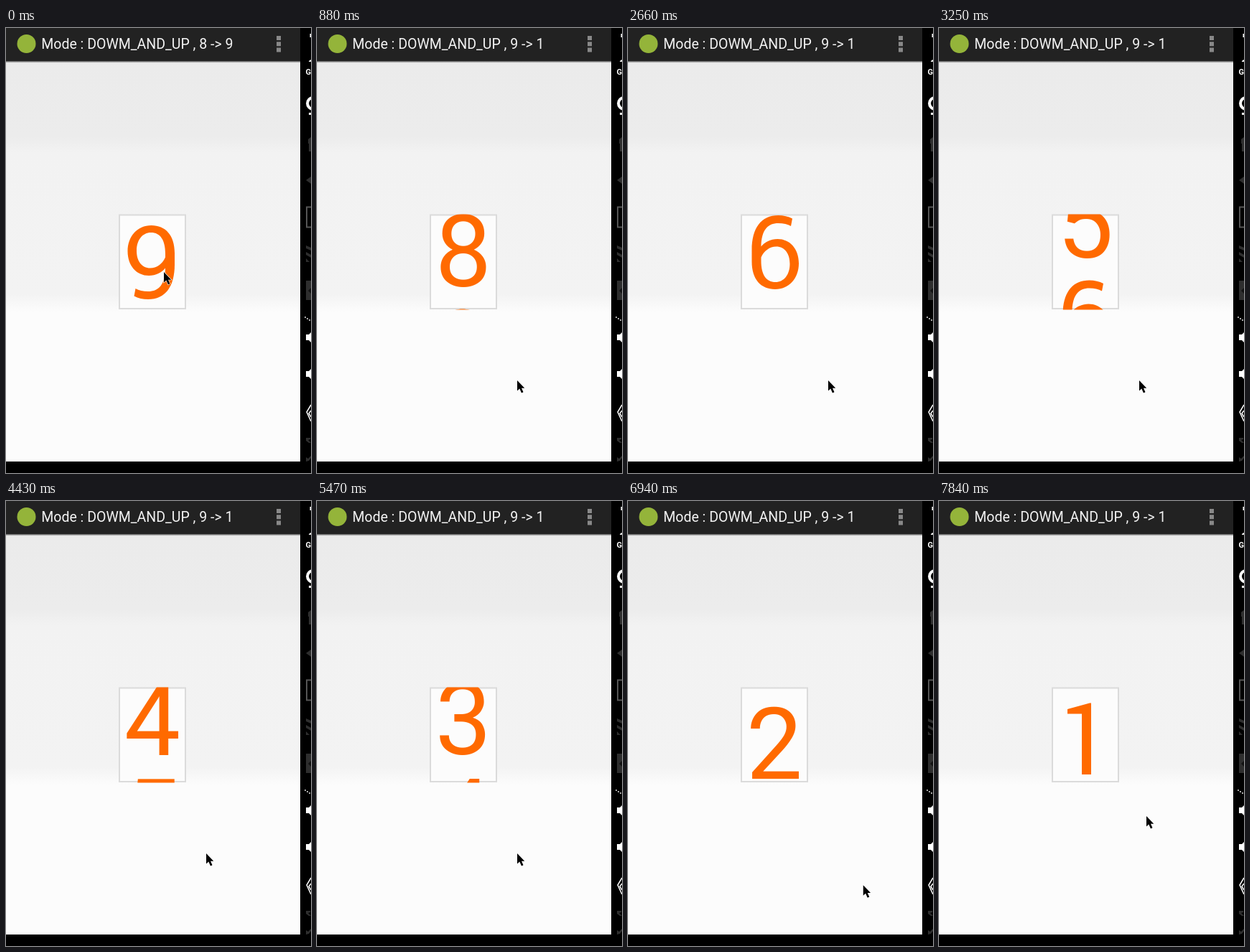
An HTML page that plays this animation: 425 px wide and 620 px high, repeating every 7990 ms.

```html
<!DOCTYPE html>
<html lang="en">
<head>
<meta charset="utf-8">
<title>Scrolling number</title>
<style>
  html, body { margin: 0; width: 100%; height: 100%; overflow: hidden; background: #000; }
  svg { display: block; width: 425px; height: 620px; }
  text { font-family: Roboto, sans-serif; }
  #title { font-size: 19.5px; fill: #f3f3f3; }
  #strip { fill: #ff6a00; font-size: 139.5px; text-anchor: middle; }
</style>
</head>
<body>
<svg viewBox="0 0 425 620">
  <defs>
    <linearGradient id="backdrop" gradientUnits="userSpaceOnUse" x1="0" y1="48" x2="0" y2="604">
      <stop offset="0" stop-color="#ebebeb"/>
      <stop offset=".185" stop-color="#ececec"/>
      <stop offset=".225" stop-color="#f2f2f2"/>
      <stop offset=".58" stop-color="#f3f3f3"/>
      <stop offset=".625" stop-color="#fcfcfc"/>
    </linearGradient>
    <linearGradient id="shadow" x2="0" y2="1">
      <stop offset="0" stop-color="#555"/>
      <stop offset="1" stop-color="#ddd"/>
    </linearGradient>
    <clipPath id="window"><rect x="158" y="259.5" width="92" height="133"/></clipPath>
  </defs>

  <rect width="425" height="620"/>
  <rect y="46" width="410" height="558" fill="url(#backdrop)"/>
  <rect width="410" height="46.5" fill="#222"/>
  <rect y="46" width="410" height="2.5" fill="url(#shadow)"/>
  <circle cx="28.5" cy="22" r="13" fill="#94b43a"/>
  <text id="title" x="49.3" y="29"></text>
  <path d="M377 11h6v6h-6zm0 8.3h6v6h-6zm0 8.3h6v6h-6z" fill="#888"/>

  <!-- toolbar cut off by the right edge -->
  <g fill="#fff">
    <path d="M423.5 8h1.5v5h-1.5zM422 46l3-2v3h-3z"/>
    <text x="417.5" y="65" font-size="11" font-weight="700">G</text>
    <circle cx="428" cy="105" r="8" fill="none" stroke="#fff" stroke-width="4"/>
    <path d="M422 118h3v3h-3z"/>
    <path d="M416 402h2v2h-2zm3 2h2v2h-2zm3 2h2v2h-2z" fill="#aaa"/>
    <path id="speaker" d="M418 427h4l3-3v14l-3-3h-4z"/>
    <use href="#speaker" y="51"/>
    <path d="M425 525l-6 10 6 13M425 533l-3 4 3 5" fill="none" stroke="#fff" stroke-width="1.5"/>
  </g>
  <g fill="#2e2e2e">
    <path d="M421 155l4-3v20h-3v-11h-1zM418 212l7-5v10z"/>
    <path d="M426 249.500h-7v28h7" fill="none" stroke="#555" stroke-width="2"/>
    <path d="M418 303l7 3v4l-7-3zm0 9l7 4v4l-7-4zm0 9l5 5h-5zM418 352h7v27h-7z"/>
    <path d="M418 571h6v2l-3 1 4 4h-3l-4-3zM418 604v-6l3 2 4-4v3l-3 4z"/>
    <path d="M421 366l4-4v8z" fill="#111"/>
  </g>

  <rect x="158" y="260.5" width="92" height="130.5" fill="#fcfcfc" stroke="#dbdbdb" stroke-width="2"/>
  <g clip-path="url(#window)"><g id="strip"></g></g>
  <path id="cursor" d="M0 0V14.500L3.300 11.500L6 17.500L8.500 16.300L6 10.700H10.300Z" stroke="#fff" stroke-width="1.2" paint-order="stroke"/>
</svg>

<script>
const LOOP = 7990, TICK = 148, LEAD = 14;
const BASELINE = 376.5, PITCH = 133;

const NINE = `M235-63C235-88 222-101.5 202.5-101.5C183-101.5 169.5-86 169.5-65.5
  C169.5-45 182-31.5 199-31.5C209-31.5 217-36 222-42C221.5-19 213-9.5 198-9.5
  C191-9.5 185-11 180.5-13.5L178.5-3C184 0 191 1.5 198 1.5C222 1.5 235-16 235-47Z
  M222-57C218-48 210-42 201-42C189-42 182-52 182-66C182-81 190-91.5 202-91.5
  C215-91.5 222-81 222-62Z`;
// Digits whose shape differs from the installed Roboto
const SHAPES = {
  1: "M212 0H199V-84.5H179V-91L210-99.5H212Z",
  6: NINE,
  7: "M169.5-99.5H237.5V-89.5C214-62 204-38 202 0H189C190-33 203-63 223-88.5H169.5Z",
  9: NINE
};

// Keys are [tick, value]
const SCROLL = [[0, 0], [1, 5], [6, 116.5], [14, 294.5], [22, 475.5], [30, 642.5], [43, 887.5], [53, 1068.5]];
const CURSOR_X = [[0, 220], [5, 279], [43, 279], [47, 344], [53, 289]];
const CURSOR_Y = [[0, 340], [5, 491], [43, 491], [47, 550], [53, 439]];

const byId = id => document.getElementById(id);
const strip = byId("strip"), cursor = byId("cursor"), title = byId("title");

function svg(name, attributes) {
  const node = document.createElementNS("http://www.w3.org/2000/svg", name);
  for (const key in attributes) node.setAttribute(key, attributes[key]);
  return node;
}

for (let digit = 1; digit <= 9; digit++) {
  const slot = svg("g", { transform: `translate(0 ${BASELINE - (9 - digit) * PITCH})` });
  const shape = SHAPES[digit];
  const glyph = shape
    ? svg("path", { d: shape, "fill-rule": "evenodd" })
    : svg("text", { x: 204 });
  if (!shape) glyph.textContent = digit;
  if (digit === 6) glyph.setAttribute("transform", "rotate(180 203.75 -50)");
  slot.append(glyph);
  strip.append(slot);
}

function track(keys, tick) {
  const next = keys.findIndex(key => key[0] > tick);
  if (next < 0) return keys[keys.length - 1][1];
  const [t0, v0] = keys[next - 1], [t1, v1] = keys[next];
  return v0 + (v1 - v0) * (tick - t0) / (t1 - t0);
}

function draw(now) {
  const tick = Math.min(53, Math.floor((now % LOOP + LEAD) / TICK));
  strip.setAttribute("transform", `translate(0 ${track(SCROLL, tick)})`);
  cursor.setAttribute("transform", `translate(${track(CURSOR_X, tick)} ${track(CURSOR_Y, tick)})`);
  title.textContent = `Mode : DOWM_AND_UP , ${tick ? "9 -> 1" : "8 -> 9"}`;
}

let start;
function play(now) {
  start ??= now;
  draw(now - start);
  requestAnimationFrame(play);
}
draw(0);
requestAnimationFrame(play);
</script>
</body>
</html>
```
